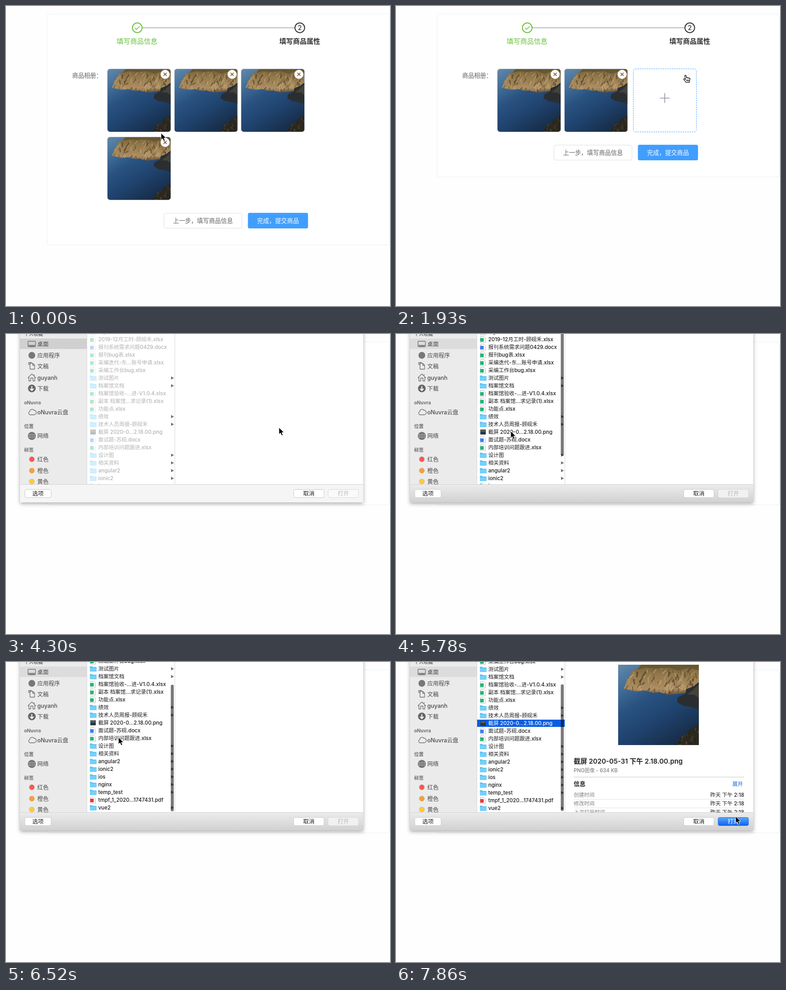
Write an HTML page that moves like this. It is 847 px wide and 661 px high and loops after 8000 ms.

```html
<!DOCTYPE html>
<html lang="zh">
<head>
<meta charset="utf-8">
<style>
html, body { margin: 0; width: 100%; height: 100%; overflow: hidden; background: #fefefe; }
svg { display: block; width: 847px; height: 661px; }
text { font-family: Inter, "Noto Sans CJK SC", "Noto Sans CJK", sans-serif; white-space: pre; }
#dialog text { font-weight: 500; }
#dialog .bold { font-weight: 700; }
#sheet { filter: drop-shadow(0 3px 4px rgba(0, 0, 0, .33)); }
.line { fill: none; stroke: #6d6d6d; stroke-width: 1.3; stroke-linejoin: round; }
</style>
</head>
<body>
<svg id="stage" viewBox="0 0 847 661">
  <defs>
    <linearGradient id="sea" x1="0" y1="0" x2=".6" y2="1">
      <stop offset="0" stop-color="#6488a9"/><stop offset=".22" stop-color="#44709a"/>
      <stop offset=".45" stop-color="#2a5381"/><stop offset=".7" stop-color="#204470"/>
      <stop offset="1" stop-color="#182f4c"/>
    </linearGradient>
    <linearGradient id="rock" x1="0" y1="0" x2="0" y2="1">
      <stop offset="0" stop-color="#74613a"/><stop offset=".35" stop-color="#94794c"/>
      <stop offset=".8" stop-color="#ac8d61"/><stop offset="1" stop-color="#5f4d36"/>
    </linearGradient>
    <linearGradient id="bar" x1="0" y1="0" x2="0" y2="1">
      <stop offset="0" stop-color="#ececec"/><stop offset="1" stop-color="#d1d1d1"/>
    </linearGradient>
    <linearGradient id="primary" x1="0" y1="0" x2="0" y2="1">
      <stop offset="0" stop-color="#5aa5fb"/><stop offset="1" stop-color="#0c63f2"/>
    </linearGradient>
    <path id="cliffShape" d="M12 53L16 44L19 34L26 25L32 13L44 7L51 0H178V50L160 60L142 63L126 65L110 67L92 61L76 62L60 57L38 59Z"/>
    <path id="shoreShape" d="M124 178L137 168L135 161L151 153L158 144L178 132V178Z"/>
    <clipPath id="cliffClip"><use href="#cliffShape"/></clipPath>
    <clipPath id="shoreClip"><use href="#shoreShape"/></clipPath>
    <clipPath id="rounded"><rect width="139" height="138" rx="5"/></clipPath>
    <clipPath id="listClip"><rect x="179" y="-20" width="194" height="351"/></clipPath>
    <clipPath id="bodyClip"><rect x="31" y="-20" width="757" height="351"/></clipPath>
    <symbol id="photo" viewBox="0 0 178 178" preserveAspectRatio="none">
      <rect width="178" height="178" fill="url(#sea)"/>
      <use href="#cliffShape" fill="url(#rock)"/>
      <g id="cliffTexture" clip-path="url(#cliffClip)"></g>
      <path fill="#62532f" opacity=".8" d="M51 0H178V12L154 7L132 13L110 6L84 9L62 6L42 11Z"/>
      <path fill="#2b2e31" d="M178 38L166 48L150 54L148 64L132 72L130 83L144 91L162 94L178 99Z"/>
      <path fill="#454239" d="M178 44L164 57L152 66L168 66L178 74Z"/>
      <use href="#shoreShape" fill="#2b281f"/>
      <g id="shoreTexture" clip-path="url(#shoreClip)"></g>
    </symbol>
    <g id="thumb">
      <g clip-path="url(#rounded)"><use href="#photo" width="139" height="138"/></g>
      <rect x="-.5" y="-.5" width="140" height="139" rx="5.5" fill="none" stroke="#c0ccda"/>
      <circle cx="127" cy="11.5" r="10" fill="#fff"/>
      <path d="M123.6 8.1l6.8 6.8m0-6.8l-6.8 6.8" stroke="#80603c" stroke-width="1.7"/>
    </g>
  </defs>

  <g id="page"></g>
  <g id="dialog"></g>
  <g id="cursor">
    <path id="arrow" fill="#000" stroke="#fff" stroke-width="1" d="M0 0V15.2L3.5 12L6 17.7L8.8 16.5L6.4 11H11.3Z"/>
    <path id="hand" fill="#fff" stroke="#000" stroke-width="1.3" stroke-linejoin="round"
      d="M-2 1C-2-.6 .7-.7 1 1L2 5.4C2.6 4.2 4.4 4.4 4.6 5.6C5.4 4.7 7 5 7.2 6.3C8.2 5.6 9.4 6.2 9.4 7.6C9.6 10.5 8.6 12 8 13.2V15.4H.5C0 12.8-3 11.3-4.3 8.8C-5 7.3-3.2 6.5-2 7.8L-.6 9ZM2.2 9.2V12.4M4.3 9.2V12.4M6.4 9.2V12.4"/>
  </g>
</svg>

<script>
const $ = id => document.getElementById(id);
const text = (x, middle, size, content, fill, attrs = '') =>
  `<text x="${x}" y="${middle + size * .36}" font-size="${size}" fill="${fill}" ${attrs}>${content}</text>`;
const rect = (x, y, w, h, fill, attrs = '') =>
  `<rect x="${x}" y="${y}" width="${w}" height="${h}" fill="${fill}" ${attrs}/>`;
const hline = (x1, x2, y, color) => `<path d="M${x1} ${y}H${x2}" stroke="${color}"/>`;
const centered = 'text-anchor="middle"';

// Rock texture: seeded slanted strokes
let seed = 7;
const random = (min, max) => {
  seed = seed * 16807 % 2147483647;
  return min + (max - min) * seed / 2147483647;
};
function strokes(count, [x, y, w, h], colors, length) {
  return Array.from({ length: count }, (_, i) => {
    const dx = random(-.7, .2) * length, dy = random(.4, 1) * length;
    return `<path d="M${random(x, x + w)} ${random(y, y + h)}l${dx} ${dy}" stroke="${colors[i % colors.length]}"
      stroke-width="${random(1.5, 4)}" opacity=".6"/>`;
  }).join('');
}
$('cliffTexture').innerHTML = strokes(110, [14, 4, 164, 54], ['#473923', '#c6aa7c', '#6b5634', '#b3976a'], 13);
$('shoreTexture').innerHTML = strokes(40, [126, 132, 52, 46], ['#5f543d', '#191a18', '#463e2b'], 7);

// Web form
$('page').innerHTML =
  rect(90.5, 17.5, 756, 509, '#fff', 'id="card" rx="4" stroke="#ebeef5"') +
  `<path d="M301 48H637" stroke="#b7bac8" stroke-width="2"/>
   <circle cx="289.5" cy="48" r="10.7" fill="#fff" stroke="#67c23a" stroke-width="2"/>
   <path d="M284.3 48.2l3.7 3.6 6.7-7" fill="none" stroke="#67c23a" stroke-width="1.5"/>
   <circle cx="648" cy="48" r="10.7" fill="#fff" stroke="#303133" stroke-width="2"/>` +
  text(648, 48, 14, '2', '#303133', centered + ' font-weight="500"') +
  text(289, 78, 15, '填写商品信息', '#67c23a', centered) +
  text(648, 78, 15, '填写商品属性', '#303133', centered + ' font-weight="700"') +
  text(146, 153, 13.2, '商品相册：', '#606266') +
  [[224, 139], [371.7, 139], [519, 139], [224, 289]].map(([x, y], i) =>
    `<use id="thumb${i}" href="#thumb" x="${x}" y="${y}"/>`).join('') +
  `<g id="add">` + rect(.5, .5, 139, 139, '#fff', 'id="addBox" rx="5" stroke-dasharray="3 2"') +
  `<path d="M59 65H80.500M69.700 54V75.500" stroke="#8c939d" stroke-width="1.6"/></g>
   <g id="actions">` +
  rect(348.5, 456.5, 172, 33, '#fff', 'rx="3.5" stroke="#dcdfe6"') +
  rect(533.6, 455.7, 132.6, 34.3, '#409eff', 'rx="3.5"') +
  text(434.5, 473, 13.2, '上一步，填写商品信息', '#606266', centered) +
  text(600, 473, 13.2, '完成，提交商品', '#fff', centered) + '</g>';

// File dialog
const files = [
  'log.xlsx', '2019-12月工时-顾砚禾.xlsx', '报刊系统需求问题0429.docx', '报刊bug表.xlsx',
  '采编迭代-东...账号申请.xlsx', '采编工作台bug.xlsx', '测试图片', '档案馆文档',
  '档案馆验收-...进-V1.0.4.xlsx', '副本 档案馆...求记录(1).xlsx', '功能点.xlsx', '绩效',
  '技术人员周报-顾砚禾', '截屏 2020-0...2.18.00.png', '面试题-苏砚.docx', '内部培训问题跟进.xlsx',
  '设计图', '相关资料', 'angular2', 'ionic2', 'ios', 'nginx', 'temp_test',
  'tmpf_1_2020...1747431.pdf', 'vue2'];
const rowY = i => 17 * i - 5;
const selected = files.findIndex(name => name.endsWith('.png'));
const typeColors = { xlsx: '#20b67a', docx: '#3d7ff0', pdf: '#e5393c' };
const fileType = name => (name.match(/\.(xlsx|docx|pdf|png)$/) || [])[1];

function fileIcon(name, y) {
  const type = fileType(name);
  if (!type) return `<path d="M185 ${y - 5.500}h5l1.500 1.500h8v10h-14.500z" fill="#58bff0"/>` +
    rect(185, y - 2.5, 14.5, 8, '#75d0fa');
  if (type === 'png') return rect(186, y - 5.5, 12, 11, '#21364d') + rect(187, y - 4.5, 10, 4, '#665d43');
  return `<path d="M186.500 ${y - 6.500}h7.500l3.500 3.500v10h-11z" fill="#fff" stroke="#bbb"/>` +
    rect(185.5, y - 3, 8, 8, typeColors[type], 'rx="1"');
}

const fileRows = files.map((name, i) => fileIcon(name, rowY(i)) +
  text(203.5, rowY(i), 11.5, name, '#1c1c1c', i === selected ? 'id="pick"' : '')).join('');
const folderArrows = files.map((name, i) => fileType(name) ? '' :
  `<path d="M364 ${rowY(i) - 3.500}l6.500 3.500-6.500 3.500z" fill="#747474"/>`).join('');

const places = [['桌面', 22], ['应用程序', 47], ['文稿', 71], ['guyanh', 96], ['下载', 120],
  ['oNuvra云盘', 172], ['网络', 224], ['红色', 276], ['橙色', 301], ['黄色', 325]];
const headings = [['个人收藏', 0], ['oNuvra', 151], ['位置', 203], ['标签', 255]];
const tags = [[276, '#fc5753'], [301, '#f7a13b'], [325, '#fdcb3e']];
const sidebarIcons = `<g class="line">
  <rect x="48.500" y="16" width="16.500" height="12" rx="1.500"/><path d="M49 25H65M51 27H63"/>
  <path d="M53 64.500h6l4 4v9h-10zM53 67h-3v-4h6v2M59 65v4h4"/>
  <path d="M48 97L57 88L66 97M50.500 95V103.500H54.500V97H59.500V103.500H63.500V95M62 92V89"/>
  <path d="M53 178a4 4 0 0 1-.5-7.500a5 5 0 0 1 9-2.500a4.500 4.500 0 0 1 .5 10z"/>
  <circle cx="57" cy="224.500" r="8.200" fill="#a9a9a9"/>
  <path d="M49 224.500H65M51 219.500H63M51 229.500H63M57 216.500V232.500"/>
  <ellipse cx="57" cy="224.500" rx="4" ry="8"/></g>
  <circle cx="57" cy="47" r="7.500" fill="#777"/>
  <circle cx="57" cy="120" r="8.500" fill="#666"/>
  <path d="M57 115V123M53 120.500L57 124.500L61 120.500" fill="none" stroke="#fff" stroke-width="2"/>` +
  tags.map(([y, color]) => `<circle cx="57" cy="${y}" r="5.700" fill="${color}" stroke="#0002"/>`).join('');

const button = (x, w, label, color, ids = '') =>
  rect(x + .5, 342.5, w - 1, 18, '#fff', `rx="3.5" stroke="#c9c9c9" ${ids && `id="${ids}Box"`}`) +
  text(x + w / 2, 351.5, 12.5, label, color, centered + (ids && ` id="${ids}Text"`));

const details = [['创建时间', 293], ['修改时间', 312], ['上次打开时间', 330.5]];
const preview = `<use href="#photo" x="490" y="6" width="178" height="177"/>` +
  text(392, 219, 14.8, '截屏 2020-05-31 下午 2.18.00.png', '#222', 'style="font-weight:600"') +
  text(392, 239, 11.2, 'PNG图像 - 634 KB', '#808080') +
  hline(392, 768, 253.5, '#c4c4c4') +
  text(392, 268, 13, '信息', '#222', 'class="bold"') +
  text(742, 268.5, 11.5, '展开', '#0b64d8') +
  details.map(([label, y]) => text(392, y, 11.5, label, '#808080') +
    text(768, y, 11.5, '昨天 下午 2:18', '#222', 'text-anchor="end"') +
    hline(392, 768, y + 9.5, '#e0e0e0')).join('');

$('dialog').innerHTML =
  rect(31, -20, 757, 391, '#fff', 'id="sheet"') +
  `<g clip-path="url(#bodyClip)">` +
  rect(31, -20, 147.5, 351, '#ebebeb') +
  rect(31, 10, 147.5, 23, '#d0d0d0', 'id="place"') +
  headings.map(([label, y]) => text(40, y, 10.4, label, '#6f6f6f', 'class="bold"')).join('') +
  places.map(([label, y]) => text(69, y, 12.5, label, '#4a4a4a')).join('') + sidebarIcons +
  `<path d="M178.500 -20V331M372.500 -20V331" stroke="#d6d6d6"/>
   <g id="preview">${preview}</g></g>
   <g clip-path="url(#listClip)"><g id="list">` +
  rect(179, rowY(selected) - 8, 193, 16, '#0a5de2', 'id="highlight"') +
  `<g id="files">${fileRows}</g>${folderArrows}</g>` +
  rect(363.5, 0, 6.5, 279, '#000', 'id="scrollbar" rx="3" opacity=".53"') + '</g>' +
  rect(31, 331, 757, 40, '#f5f5f5', 'id="footer"') + hline(31, 788, 331.5, '#d2d2d2') +
  button(41, 59, '选项', '#222') + button(634, 68, '取消', '#222') + button(710, 68, '打开', '#b8b8b8', 'open');

// Tracks hold each value until the next entry: [time, value...]
const cursorTrack = [
  [0, 342, 280], [140, 344, 288, 1], [290, 345, 293, 1], [440, 346, 295, 1],
  [1040, 520, 215], [1190, 664, 132], [1480, 650, 146, 1], [1630, 639, 153, 1],
  [2230, 632, 165, 1], [2380, 622, 181, 1], [2520, 612, 196, 1], [2670, 605, 205, 1], [2810, 601, 208, 1],
  [4300, 602, 206], [4450, 270, 220], [5340, 258, 216], [5490, 253, 214],
  [6070, 252, 205], [6220, 250, 190], [6370, 249, 176], [6520, 248, 166],
  [6670, 247, 150], [6820, 247, 137], [6970, 247, 130],
  [7410, 330, 175], [7560, 520, 255], [7710, 690, 325], [7860, 749, 340]];
const slideTrack = [[0, -500], [4010, -371], [4160, -130], [4300, 0]];
const fadeTrack = [[0, .33], [4740, .55], [4890, .8], [5040, 1]];
const scrollTrack = [[0, 0], [5930, 10], [6070, 32], [6220, 58], [6370, 75], [6520, 82], [6670, 81]];
const valueAt = (track, t) => track.filter(entry => entry[0] <= t).pop().slice(1);

const move = (id, x, y) => $(id).setAttribute('transform', `translate(${x} ${y})`);
const show = (id, visible) => $(id).setAttribute('visibility', visible ? 'visible' : 'hidden');
const set = (id, name, value) => $(id).setAttribute(name, value);

function render(t) {
  const firstRemoved = t >= 740, secondRemoved = t >= 1930;
  const lift = secondRemoved ? -150 : firstRemoved ? -11 : 0;
  set('card', 'height', 509 + lift);
  move('actions', 0, lift);
  show('thumb3', !firstRemoved);
  show('thumb2', !secondRemoved);
  show('add', firstRemoved);
  move('add', secondRemoved ? 523 : 223, secondRemoved ? 138 : 288);
  set('addBox', 'stroke', t >= 1040 && !secondRemoved ? '#c0ccda' : '#409eff');
  set('addBox', 'fill', t >= 2230 ? '#fbfdff' : '#fff');

  const active = t >= 4450, picked = t >= 7260, previewed = t >= 7410;
  const [scroll] = valueAt(scrollTrack, t);
  show('dialog', t >= 4010);
  move('dialog', 0, valueAt(slideTrack, t)[0]);
  set('place', 'fill', active ? '#dcdcdc' : '#d0d0d0');
  set('footer', 'fill', active ? 'url(#bar)' : '#f5f5f5');
  set('files', 'opacity', valueAt(fadeTrack, t)[0]);
  move('list', 0, -scroll);
  set('scrollbar', 'y', -11 + scroll * .745);
  $('scrollbar').style.display = t >= 5340 ? '' : 'none';
  $('highlight').style.display = picked ? '' : 'none';
  set('pick', 'fill', picked ? '#fff' : '#1c1c1c');
  $('preview').style.display = previewed ? '' : 'none';
  set('openBox', 'fill', previewed ? 'url(#primary)' : active ? '#f1f1f1' : '#fafafa');
  set('openBox', 'stroke', previewed ? '#2a73e8' : '#dadada');
  set('openText', 'fill', previewed ? '#fff' : '#b8b8b8');

  const [x, y, pointing] = valueAt(cursorTrack, t);
  move('cursor', x, y);
  show('hand', pointing);
  show('arrow', !pointing);
}

const start = performance.now();
function tick() {
  render((performance.now() - start) % 8000);
  requestAnimationFrame(tick);
}
tick();
</script>
</body>
</html>
```
